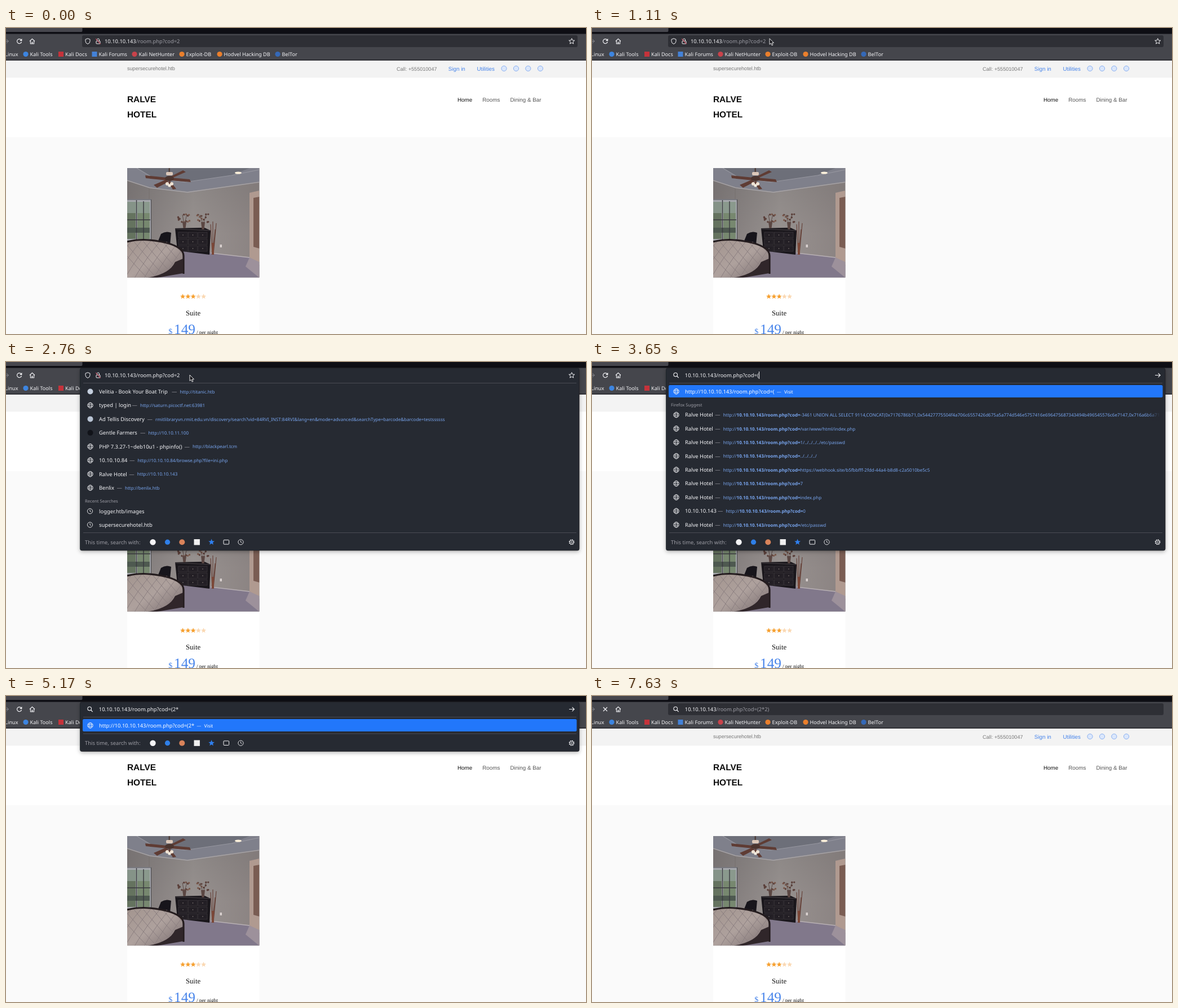
An HTML page for the animation above (8000 ms loop, 1029 by 544 pixels).

```html
<!DOCTYPE html>
<html lang="en">
<head>
<meta charset="utf-8">
<title>Hotel room page</title>
<style>
html, body { margin: 0; width: 100%; height: 100%; overflow: hidden; background: #fafafa; }
svg { display: block; width: 100%; height: 100%; }
text { text-rendering: geometricPrecision; white-space: pre; }
.ui { font-family: "Noto Sans", sans-serif; }
.sans { font-family: "Liberation Sans", Arial, sans-serif; }
.serif { font-family: "Liberation Serif", "Times New Roman", serif; }
</style>
</head>
<body>
<svg id="stage" viewBox="0 0 1029 544"></svg>
<script>
const LOOP = 8000, INK = '#f4f4f7', LINK = '#79a6f0', PANEL = '#262932', DIM = '#9d9da5';
const HOST = '10.10.10.143', PAGE = '/room.php?cod=';

const esc = s => s.replace(/&/g, '&amp;').replace(/</g, '&lt;');
const rect = (x, y, w, h, fill, more = '') =>
  `<rect x="${x}" y="${y}" width="${w}" height="${h}" fill="${fill}" ${more}/>`;
const dot = (x, y, r, fill, more = '') => `<circle cx="${x}" cy="${y}" r="${r}" fill="${fill}" ${more}/>`;
const shape = (d, fill, more = '') => `<path d="${d}" fill="${fill}" ${more}/>`;
const line = (d, color = INK, w = 1, more = '') =>
  `<path d="${d}" fill="none" stroke="${color}" stroke-width="${w}" ${more}/>`;
const group = (id, body, more = '') => `<g id="${id}" ${more}>${body}</g>`;
// y is the middle of the capitals
const rawText = (x, y, body, size, fill, cls = 'ui', more = '') =>
  `<text class="${cls}" x="${x}" y="${(y + size * 0.357).toFixed(2)}" font-size="${size}" fill="${fill}" ${more}>${body}</text>`;
const text = (x, y, s, ...rest) => rawText(x, y, esc(s), ...rest);

function star(x, y, r, fill, more) {
  let d = '';
  for (let i = 0; i < 10; i++) {
    const a = i * Math.PI / 5 - Math.PI / 2, q = i % 2 ? r * 0.45 : r;
    d += (i ? 'L' : 'M') + (x + q * Math.cos(a)).toFixed(2) + ' ' + (y + q * Math.sin(a)).toFixed(2);
  }
  return shape(d + 'Z', fill, more);
}
const globe = (x, y) => dot(x, y, 4.7, 'none', `stroke="${INK}" stroke-width=".9"`) +
  `<ellipse cx="${x}" cy="${y}" rx="2.1" ry="4.7" fill="none" stroke="${INK}" stroke-width=".8"/>` +
  line(`M${x - 4.5} ${y - 1.6}h9M${x - 4.5} ${y + 1.6}h9`, INK, 0.8);
const clock = (x, y) => dot(x, y, 4.6, 'none', `stroke="${INK}" stroke-width=".9"`) +
  line(`M${x} ${y - 2.8}V${y}L${x + 2} ${y + 1.2}`, INK, 0.9);
const gear = (x, y) => dot(x, y, 4.3, 'none', `stroke="${INK}" stroke-width="1.2" stroke-dasharray="1.9 1.48"`) +
  dot(x, y, 3.4, 'none', `stroke="${INK}" stroke-width=".9"`) + dot(x, y, 1.3, 'none', `stroke="${INK}" stroke-width=".8"`);

function chrome() {
  const marks = [
    ['Kali Tools', 35, '#3d85e0', 1], ['Kali Docs', 97.5, '#c5333b', 0], ['Kali Forums', 157, '#4482d8', 0],
    ['Kali NetHunter', 228, '#c9434b', 1], ['Exploit-DB', 312, '#ea7f2c', 1],
    ['Hodvel Hacking DB', 379, '#ea7f2c', 1], ['BelTor', 482, '#3569b8', 1]
  ];
  return rect(0, 0, 1029, 11, '#0e0e14') +
    shape('M0 0H135.500V5Q135.500 7 133.500 7H0Z', '#47474e') +
    rect(0, 10.5, 1029, 46.5, '#45464c') + rect(0, 56.4, 1029, 1.4, '#1b1b20') +
    rect(135, 13, 879, 21, '#2e2f35', 'rx="3"') +
    line('M0 23.500H4M1 20L4.500 23.500L1 27', '#85858c') +
    line('M42 23.500L46.500 19.300L51 23.500M43.400 23V28H49.600V23', INK, 1.1) + rect(45.6, 24.6, 1.8, 3.4, INK) +
    text(21.5, 46.6, 'Linux', 9.12, INK, 'ui', 'text-anchor="end"') +
    marks.map(([name, x, color, round]) =>
      (round ? dot(x, 46.5, 4.6, color) : rect(x - 4.5, 42, 9, 9, color)) +
      text(x + 7.6, 46.6, name, 9.12, INK)).join('');
}

function room() {
  let twigs = '', quilt = '', drawers = '';
  for (let i = 0; i < 26; i++) {
    const x = (i % 2 ? 349 : 315.5) + Math.sin(i * 5.3) * 10, y = 338 + Math.cos(i * 3.7) * 7;
    twigs += dot(x.toFixed(1), y.toFixed(1), 1.7, i % 3 ? '#5a3f39' : '#79584b');
  }
  for (let i = 0; i < 9; i++)
    quilt += line(`M${190 + i * 17} 376q22 28 62 70M${225 + i * 17} 376q-26 30 -50 72`, '#8b7f80', 1);
  for (let r = 0; r < 3; r++)
    for (let c = 0; c < 3; c++)
      drawers += rect(306 + c * 17.5, 363 + r * 12, 16, 10, '#231f25', 'stroke="#454045" stroke-width=".6"') +
        dot(314 + c * 17.5, 368 + r * 12, 0.7, '#a0978f');
  return rect(215, 249, 235, 195, 'url(#wall)') + rect(215, 249, 235, 195, 'url(#dusk)') +
    shape('M215 249H449.500V273L322 291L255 283L215 270Z', '#7f808b') +
    shape('M232 249H432L400 262L318 274L262 267Z', '#6d6f79') +
    line('M232 249L262 267L318 274L400 262L449 252', '#96969f', 1.2) +
    line('M215 271L255 284L322 292L449.500 274', '#a6a3a7', 1.5) +
    line('M254 285V376', '#77706f', 1) +
    `<ellipse cx="412" cy="257.500" rx="6" ry="2" fill="#fff2dc"/>` +
    rect(215, 304, 43, 76, '#a6a8ad') + rect(215, 309, 15, 66, '#65735f') + rect(233, 309, 22, 66, '#77886f') +
    rect(215, 309, 40, 20, '#93a29a', 'opacity=".7"') + rect(215, 355, 40, 9, '#4e5950') +
    line('M215 341H256M231.500 306V378M244 308V376', '#3a3a3f', 1.4) +
    line('M215 305H257.500V380', '#4c4b50', 1.2) +
    shape('M432 293L449.500 289V423L432 410Z', '#b09a90') + shape('M439 302L449.500 300V392L439 389Z', '#7a5d53') +
    shape('M258 379L300 388L372 401L432 408L449.500 421V444H258Z', '#81788b') +
    shape('M432 408L449.500 416V444L425 424Z', '#9d919b') +
    line('M363 400L432 408', '#b8b0b4', 1.6) +
    shape('M275 366Q284 360 293 364L291 385H287L286 380H275L272 384H268L271 376Z', '#17151b') +
    shape('M300 356L352 355L363 360L361 403L304 396Z', '#19161b') + drawers +
    line('M300 357L363 360', '#4c464a', 1.2) +
    twigs + line('M316 348L313 332M317 348L321 331M349 348L344 332M350 348L355 332', '#503b36', 0.8) +
    shape('M313 345H320L318.500 356H314.500ZM346 345H353L351.500 358H347.500Z', '#5b4743') +
    line('M366 402L363 349M367 402L367 344M368 402L373 347M367 402L371 358', '#643f36', 1.1) +
    rect(365, 382, 4, 21, '#7c4838') + rect(379.5, 385, 3.5, 5, '#d8d0ce') +
    shape('M215 381Q250 371 290 384Q310 389 314 400L312 434L266 444H215Z', 'url(#cover)') +
    `<g clip-path="url(#bed)">${quilt}</g>` +
    line('M215 380Q242 373 276 380Q316 388 315 406V437', '#241c1e', 3.2) +
    shape('M314 410V436L268 444H250Q290 438 300 416Z', '#30262a') +
    rect(288.5, 249, 2.5, 13, '#50413d') +
    shape('M286 266L247 262L248 267L286 271ZM293 266L326 269L328 274L293 271ZM283 270L262 279L268 284L289 273ZM292 264L314 253L319 256L294 267ZM291 272L302 286L296 287L287 273Z', '#5f3c34') +
    `<ellipse cx="290" cy="267.500" rx="8" ry="4.500" fill="#4b352f"/>` +
    rect(284, 256, 12, 6, '#dcc8b9', 'rx="2"') + dot(286, 277, 3, '#efe2d3') + dot(294, 277, 3, '#efe2d3') + dot(290, 280, 2.6, '#f8eee0');
}

function page() {
  const nav = [['Home', 801, '#111'], ['Rooms', 845.3, '#555'], ['Dining & Bar', 894.4, '#555']];
  return rect(0, 57, 1029, 31.5, '#f3f3f3') + rect(0, 88.5, 1029, 105.5, '#fff') +
    rect(0, 194, 1029, 350, '#fafafa') + rect(215, 249, 234.5, 295, '#fff') +
    text(215, 72, 'supersecurehotel.htb', 9.1, '#777', 'sans') +
    text(693, 72.6, 'Call: +555010047', 9.1, '#777', 'sans') +
    text(784.8, 72.4, 'Sign in', 9.8, '#4583ea', 'sans') +
    text(835.4, 72.4, 'Utilities', 9.8, '#4583ea', 'sans') +
    [883.5, 905, 926.3, 948].map(x => dot(x, 72, 4.6, '#dbe7fb', 'stroke="#7fa9ef" stroke-width=".9"')).join('') +
    text(215, 126.8, 'RALVE', 15.4, '#0c0c0c', 'sans', 'font-weight="700"') +
    text(215, 153.5, 'HOTEL', 15.4, '#0c0c0c', 'sans', 'font-weight="700"') +
    nav.map(([s, x, c]) => text(x, 127.9, s, 9.8, c, 'sans')).join('') +
    `<g clip-path="url(#photo)">${room()}</g>` +
    [0, 1, 2, 3, 4].map(i => star(313.6 + i * 9.25, 477.4, 4.8, i < 3 ? '#f6a030' : '#fad8b3')).join('') +
    text(332, 506.3, 'Suite', 12.7, '#111', 'serif', 'text-anchor="middle"') +
    text(288.2, 539.3, '$', 14, '#4583ea', 'serif') +
    text(298, 535.2, '149', 25.3, '#4583ea', 'serif') +
    text(338, 541.1, '/ per night', 9.2, '#111', 'serif');
}

const row = (y, title, urlX, url, icon = globe(149.5, y)) => icon + text(165, y, title, 9.4, INK) +
  text(urlX - 14.5, y, '—', 9.4, '#8d8d96') + rawText(urlX, y + 0.3, url, 8.03, LINK);
const recent = (y, s) => clock(149, y) + text(165, y, s, 9.43, INK);
const label = (y, s) => text(140, y, s, 7.65, DIM);

function engines(bottom) {
  const y = bottom - 14.8;
  return line(`M137 ${bottom - 31.5}H1012`, '#4a4c55') +
    text(140, y, 'This time, search with:', 9.42, DIM) +
    dot(260.5, y, 5.2, '#f4f4f6') + dot(286.5, y, 4.6, '#2f7fe8') + dot(312.3, y, 5, '#d9835a') +
    rect(333.5, y - 5.2, 10.4, 10.4, '#f0f0f0') + star(364.6, y, 5.6, '#2f7fee') +
    rect(386, y - 3.8, 9.6, 7.6, 'none', `rx="1" stroke="${INK}"`) + clock(416.5, y) + gear(1003.5, y);
}
const panel = (id, bottom, body) => group(id,
  rect(131.5, 11, 885.5, bottom - 11, PANEL, 'rx="3" stroke="#1b1d24" stroke-width=".7" filter="url(#shade)"') +
  line('M137 37.500H1012', '#4a4c55') + body + engines(bottom));

function history() {
  const list = [
    ['Velitia - Book Your Boat Trip', 308.5, 'http://titanic.htb', '#c4cedd'],
    ['typed | login', 238, 'http://saturn.picoctf.net:63981'],
    ['Ad Tellis Discovery', 265, 'rmitlibraryvn.rmit.edu.vn/discovery/search?vid=84RVI_INST:84RVI&lang=en&mode=advanced&searchType=barcode&barcode=testssssss', '#b9c4d4'],
    ['Gentle Farmers', 252.5, 'http://10.10.11.100', '#111319'],
    ['PHP 7.3.27-1~deb10u1 - phpinfo()', 331, 'http://blackpearl.tcm'],
    ['10.10.10.84', 233.5, 'http://10.10.10.84/browse.php?file=ini.php'],
    ['Ralve Hotel', 232.8, 'http://10.10.10.143'],
    ['Benlix', 211, 'http://benlix.htb']
  ];
  return list.map(([title, x, url, mark], i) => {
    const y = 52.5 + i * 24.45;
    return row(y, title, x, esc(url), mark && dot(149.5, y, 5, mark));
  }).join('') + label(247.7, 'Recent Searches') + recent(265.2, 'logger.htb/images') + recent(289.4, 'supersecurehotel.htb');
}

function matches(count) {
  const tails = [
    '-3461 UNION ALL SELECT 9114,CONCAT(0x7176786b71,0x54427775504f4a706c6557426d675a5a774d546e5757416e696475687343494b496545576c6e7147,0x716a6b6a71',
    '/var/www/html/index.php', '1/../../../../etc/passwd', '../../../../',
    'https://webhook.site/b5fbbfff-2fdd-44a4-b8d8-c2a5010be5c5', '7', 'index.php', '0', '/etc/passwd'
  ];
  const rows = tails.slice(0, count).map((tail, i) => {
    const url = `http://<tspan font-weight="700">${HOST + PAGE}</tspan>${esc(tail)}`;
    return row(94 + i * 24.42, i === 7 ? HOST : 'Ralve Hotel', i === 7 ? 237.6 : 232.8, url);
  }).join('');
  return label(76.7, 'Firefox Suggest') + `<g clip-path="url(#list)">${rows}</g>` +
    rect(984, 84, 26, 20, 'url(#fade)');
}

const stage = document.getElementById('stage');
stage.innerHTML = `<defs>
  <linearGradient id="wall"><stop stop-color="#7d7777"/><stop offset=".5" stop-color="#989290"/><stop offset="1" stop-color="#8a8281"/></linearGradient>
  <linearGradient id="dusk" x2="0" y2="1"><stop offset=".2" stop-color="#555" stop-opacity=".15"/><stop offset=".6" stop-color="#555" stop-opacity="0"/></linearGradient>
  <linearGradient id="cover" x2="1" y2="1"><stop stop-color="#a3958f"/><stop offset=".5" stop-color="#aea19d"/><stop offset="1" stop-color="#786c6e"/></linearGradient>
  <linearGradient id="fade"><stop stop-color="${PANEL}" stop-opacity="0"/><stop offset=".95" stop-color="${PANEL}"/></linearGradient>
  <clipPath id="photo"><rect x="215" y="249" width="234.500" height="194.500"/></clipPath>
  <clipPath id="bed"><path d="M215 381Q250 371 290 384Q310 389 314 400L300 416Q290 438 262 444H215Z"/></clipPath>
  <clipPath id="list"><rect x="136" y="40" width="874" height="310"/></clipPath>
  <filter id="shade" x="-5%" y="-20%" width="110%" height="150%"><feDropShadow dx="0" dy="2" stdDeviation="3.500" flood-opacity=".3"/></filter>
</defs>` + page() + chrome() +
  group('reload', line('M27.200 21.800A4 4 0 1 0 27.500 24.500', INK, 1.2) + shape('M28.400 18.800V23H24.200Z', INK)) +
  group('stop', line('M20 20L27 27M27 20L20 27', INK, 1.2)) +
  panel('open', 335, history()) +
  panel('tall', 352, matches(7) + label(264.7, 'Recent Searches') + recent(282.2, 'logger.htb/images') + recent(306.4, 'supersecurehotel.htb')) +
  panel('match', 335, matches(9)) +
  panel('short', 98.5, '') +
  group('visit', rect(136, 41, 876.5, 22, '#2277fb', 'rx="2.500"') + globe(149.5, 52.3) +
    rawText(165, 52.4, '<tspan id="target"></tspan><tspan dx="4" font-size="8.050" fill="#cfe0ff">—</tspan><tspan dx="5.300" font-size="8.050">Visit</tspan>', 9.37, '#fff')) +
  rect(175, 17, 134, 13.5, '#2a7de6', 'id="picked"') +
  group('site', line('M145 18.700L149 20.200V23.500Q149 27 145 28.500Q141 27 141 23.500V20.200Z', INK, 1) +
    rect(160, 23, 7, 5, 'none', `rx="1" stroke="${INK}"`) + line('M161.500 23V21A2 2 0 0 1 165.500 21V23', INK, 1) +
    line('M159.300 19L167.500 28.300', '#e2566a', 1.1)) +
  group('lens', dot(148.2, 22.6, 3.3, 'none', `stroke="${INK}" stroke-width="1.100"`) + line('M150.600 25L153.700 28.100', INK, 1.2)) +
  group('save', star(1003.7, 23.8, 5.3, 'none', `stroke="${INK}" stroke-width="1" stroke-linejoin="round"`)) +
  group('go', line('M999 23.500H1008M1004.500 19.800L1008.200 23.500L1004.500 27.200', INK, 1.1)) +
  rawText(175, 23.5, '<tspan id="host"></tspan><tspan id="path"></tspan>', 9.37, INK, 'ui', 'id="input"') +
  rect(0, 17, 1, 13, INK, 'id="caret"') +
  group('cursor', shape('M0 0V10.500L2.400 8.400L4.100 12.200L5.900 11.400L4.200 7.700H7.500Z', '#15151a', 'stroke="#fff" stroke-width=".9"'));

const el = {};
stage.querySelectorAll('[id]').forEach(n => el[n.id] = n);
const show = (id, on) => el[id].style.display = on ? '' : 'none';

const views = [[0, 'idle'], [1280, 'open'], [2990, 'tall'], [3400, 'match'], [3720, 'short'], [7350, 'load']];
const typed = [[0, '2'], [2990, ''], [3300, '('], [3950, '(2'], [4770, '(2*'], [6380, '(2*2'], [6860, '(2*2)']];
const echoed = [[0, ''], [3400, '('], [4040, '(2'], [4870, '(2*'], [6480, '(2*2'], [6910, '(2*2)']];
const blink = [[0, 0], [1560, 1], [2760, 0], [2990, 1], [5170, 0], [6380, 1], [7350, 0]];
const trail = [[100, 985, 538], [250, 900, 420], [450, 640, 190], [650, 420, 60], [780, 335, 6], [890, 316, 16],
  [920, 312, 18], [1000, 321, 20], [1110, 315, 18.7], [1279, 315, 18.7], [1280, 318, 19.7],
  [1560, 318, 19.7], [1610, 332, 25], [1660, 326, 23], [2990, 326, 23]];

const at = (list, t) => list.reduce((v, [k, x]) => t >= k ? x : v, list[0][1]);
function along(list, t) {
  const i = Math.max(1, list.findIndex(p => p[0] > t));
  const [t0, x0, y0] = list[i - 1], [t1, x1, y1] = list[i], k = (t - t0) / (t1 - t0);
  return [x0 + (x1 - x0) * k, y0 + (y1 - y0) * k];
}

function draw(t) {
  const view = at(views, t), searching = t >= 2990, loading = view === 'load';
  const resting = view === 'idle' || loading;
  ['open', 'tall', 'match', 'short'].forEach(id => show(id, id === view));
  show('visit', searching && !loading);
  el.target.textContent = 'http://' + HOST + PAGE + at(echoed, t);
  show('picked', t >= 1280 && t < 1560);
  show('site', !searching);
  show('lens', searching);
  show('save', !searching);
  show('go', searching && !loading);
  show('reload', t < 7400);
  show('stop', t >= 7400);

  const x = searching ? 164.8 : 175;
  el.input.setAttribute('x', x);
  el.host.textContent = HOST;
  el.path.textContent = PAGE + at(typed, t);
  el.path.setAttribute('fill', resting ? DIM : INK);
  show('caret', at(blink, t));
  el.caret.setAttribute('x', Math.round(x + el.input.getComputedTextLength()));

  const moving = t >= 100 && t < 2990;
  show('cursor', moving);
  if (moving) el.cursor.setAttribute('transform', `translate(${along(trail, t)})`);
}

const start = performance.now();
function tick() {
  draw((performance.now() - start) % LOOP);
  requestAnimationFrame(tick);
}
tick();
</script>
</body>
</html>
```
